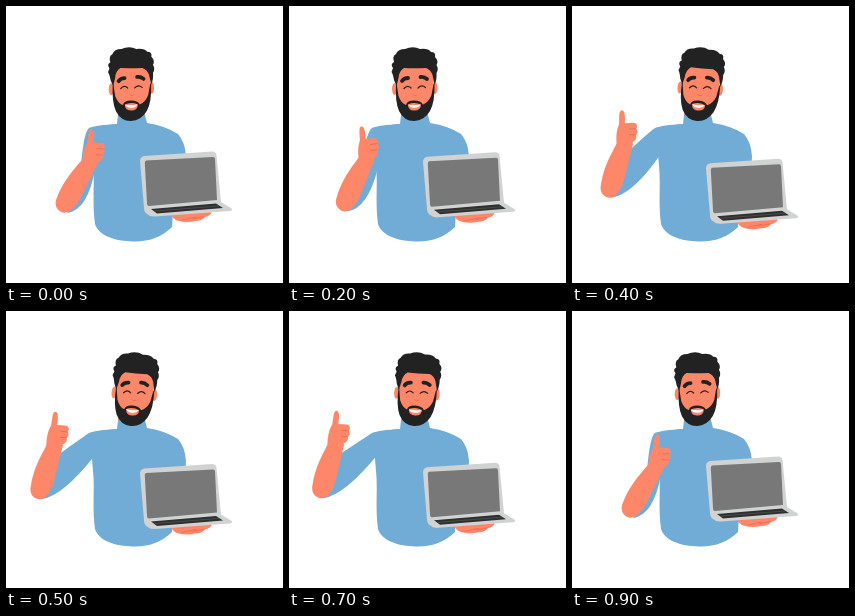
Animation, 277 px wide and 277 px high, one loop 1000 ms. Source, as an HTML page:

```html
<!DOCTYPE html>
<html lang="en">
<head>
<meta charset="utf-8">
<title>Thumbs up</title>
<style>
  html, body { margin: 0; height: 100%; overflow: hidden; background: #fff; }
  svg { display: block; width: 100vw; height: 100vh; }
  .skin { fill: #ff8769; }
  .shade { fill: #ee6b52; }
  .shirt { fill: #70acd6; }
  .dark { fill: #222; }
  .line { fill: none; stroke: #222; stroke-width: 1.2; stroke-linecap: round; }
  .fold { fill: none; stroke: #e9694f; stroke-width: .8; stroke-linecap: round; }
</style>
</head>
<body>
<svg viewBox="0 0 277 277">
  <path id="sleeve" class="shirt"/>
  <path class="shade" d="M113 98L112 112H139L138 98Z"/>
  <path class="shirt" d="M112 109Q125 113 139 109L141 117Q160 120 172 128Q179 136 180 150L178 190L167 205L166 221C156 231 143 236 127 235.500C109 235 93 230 89 218C86 195 89 178 87 160L84 124Q88 120 111 118Z"/>

  <g id="head">
    <ellipse class="skin" cx="105.500" cy="83" rx="2.500" ry="6"/>
    <ellipse class="skin" cx="146" cy="82" rx="2.500" ry="6"/>
    <path class="dark" d="M107 78Q106 96 110 105Q115 115 125 115Q135 115 141 105Q146 96 145.500 78Z"/>
    <path class="skin" d="M108 58L108 80L109.500 90Q112 97 117 99Q118 94.500 125 94.500Q132 94.500 134 98.500Q140 96 142.500 89L144.500 78L145 58Z"/>
    <path class="skin" d="M119 98.500Q125 95.500 132 98.500Q132 104.500 125 104.500Q119 104.500 119 98.500Z"/>
    <path d="M119 98.800Q125 99.500 131.500 98.500Q130 101.800 125 101.800Q121 101.800 119 98.800Z" fill="#fff"/>
    <path class="dark" d="M107.500 80L105 74Q104 68 102.500 66L104 62Q101 58 105 56Q103 50 107 48Q109 43 116 43Q124 39.500 131 43Q139 42 142 46Q147 46 146 51Q150 55 147.500 59Q150 63 147.500 67Q148 74 145.500 79L143.500 69Q142 64 137 62Q125 62.500 115 62Q110 65 109.500 72Z"/>
    <path class="line" d="M113 75Q115 72 119 72M131.500 71Q135 70.500 138 73" style="stroke-width:3.800"/>
    <path class="line" d="M115 82.500Q118.500 78.500 122 82M129 82Q132.500 78 136.500 81.500"/>
    <path class="fold" d="M124 89Q126 90.500 128 89"/>
  </g>

  <g id="laptop">
    <path class="skin" d="M164 205L206 205Q205 210 199 211Q196 215 189 215Q181 217 173 215Q166 214 164 205Z"/>
    <path class="fold" d="M187 213L198 210.500M176 214L190 211"/>
    <path d="M138 150L206 145.500Q210 145.500 210.500 149L215 196L225 202Q228 204 224 205L149 210.500Q144 211 141 208Q138 206 138 202L134 155Q134 151 138 150Z" fill="#d1d2d2"/>
    <path d="M140 154.500L207 151Q209 151 209 153L211 194L143 200Q141 200 141 197L138.800 157Q138.700 155 140 154.500Z" fill="#787878"/>
    <path d="M145 203L210 197.500L217 202L151 207.500Z" fill="#303030"/>
    <path d="M149 205L213 200" stroke="#555" stroke-width=".7"/>
  </g>

  <path id="forearm" class="skin" d="M-6 -46C-10 -30 -13 -15 -11 0C-11 9 -4 13 2 11C8 8 10 0 10 -10C10 -24 9 -36 9 -47Z"/>
  <g id="hand">
    <path class="skin" d="M-7 4C-8 -7 -7 -14 -4 -20C-3 -26 -4 -33 -1 -34C3 -34.500 2.500 -27 2 -21L10 -21C14 -21 15 -17 13 -15C15 -12 14 -9.500 12.500 -9C13.500 -5 11 -3 9 -2L6 5Z"/>
    <path class="fold" d="M6 -15H12.500M6 -9H12"/>
  </g>
</svg>
<script>
const STEP = 100, STEPS = 10;
const $ = id => document.getElementById(id);
const easeOut = x => 1 - (1 - Math.min(1, Math.max(0, x))) ** 2;

// Rise to 1 by the peak step, sag slowly, then snap back to rest on the last step.
const swing = (k, peak, sag) => k === STEPS - 1 ? 0 :
  easeOut((k - 1.85) / (peak - 1.85)) - sag * Math.max(0, k - peak) ** 2;

const move = (id, x, y, turn = 0) =>
  $(id).setAttribute("transform", `translate(${x} ${y}) rotate(${turn})`);

function draw(k) {
  const lift = swing(k, 6, .01);
  const sway = swing(k, 4.5, .025);
  const lag = Math.max(0, Math.sin(k * Math.PI / 5));

  const x = 61 - 27 * lift - lag, y = 196 - 20 * lift;
  const arm = 28 - 13 * lift - 4 * lag, a = arm * Math.PI / 180;
  const along = d => [x + d * Math.sin(a), y - d * Math.cos(a)];
  const [wx, wy] = along(44);

  move("forearm", x, y, arm);
  move("hand", wx + 2 - 2 * lift, wy, 4 - 12 * lag);
  move("laptop", 0, 7.5 * sway);
  $("head").setAttribute("transform", `rotate(${5.6 * sway - .6} 125 112)`);
  $("sleeve").setAttribute("d",
    `M112 118Q90 119 83 122Q77 126 ${along(28)}L${x} ${y + 11}Q${x + 21} ${y + 8} 89 ${y - 33}Z`);
}

function tick() {
  draw(Math.floor(performance.now() / STEP) % STEPS);
  requestAnimationFrame(tick);
}
tick();
</script>
</body>
</html>
```
